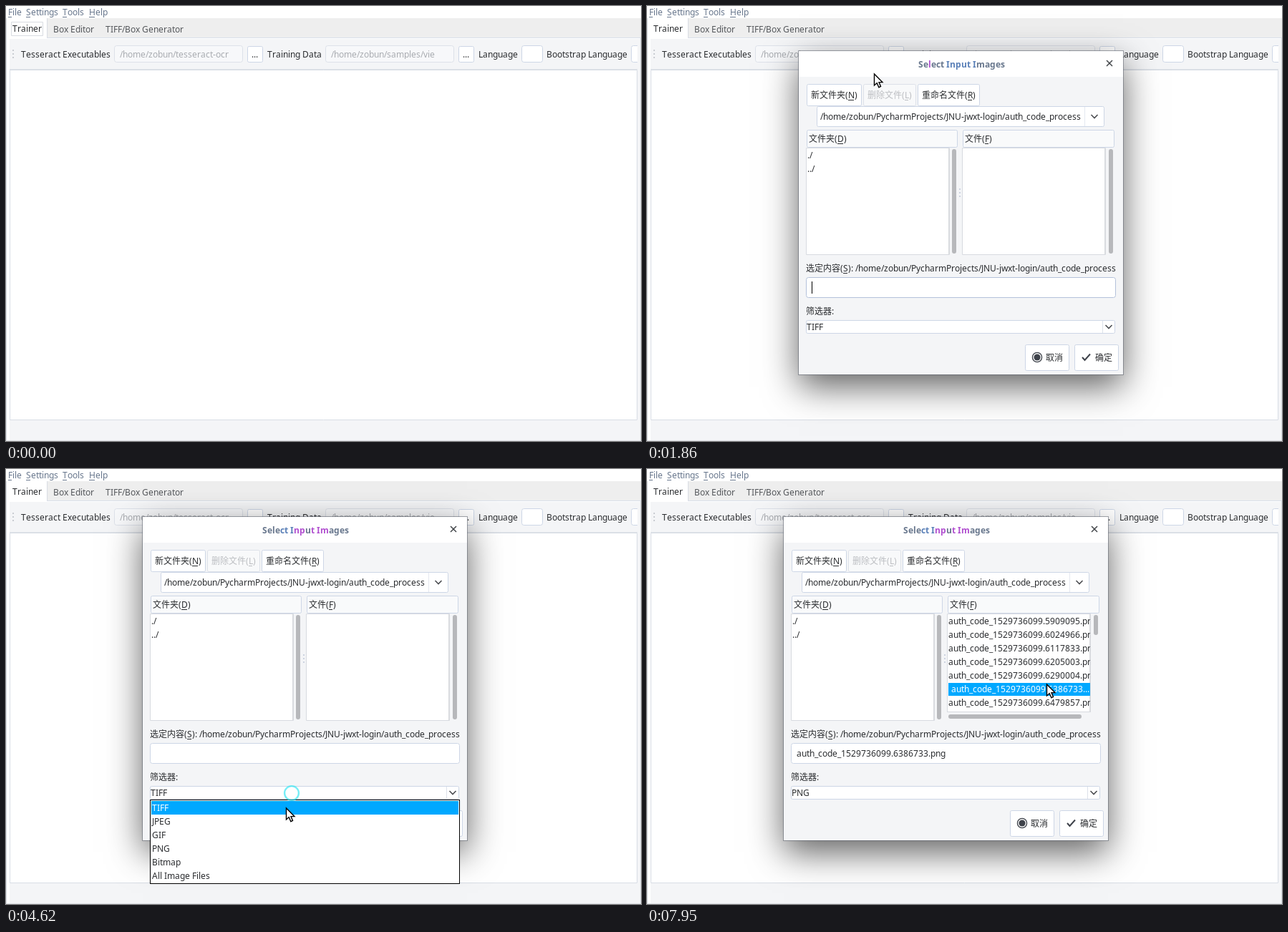
Write an HTML page with a canvas that moves like this. It is 887 px wide and 608 px high and loops after 7990 ms.

```html
<!DOCTYPE html>
<html lang="en">
<head>
<meta charset="utf-8">
<title>Training tool file dialog</title>
<style>
html, body { margin: 0; width: 100%; height: 100%; overflow: hidden; background: #fff; }
canvas { display: block; }
</style>
</head>
<body>
<canvas id="stage" width="887" height="608"></canvas>
<script>
const W = 887, H = 608, LOOP = 7990;
const stage = document.getElementById('stage').getContext('2d');
const layer = Object.assign(document.createElement('canvas'), { width: W, height: H }).getContext('2d');
let g = stage;

const FAMILY = '"Noto Sans", "Noto Sans CJK SC", "Noto Sans CJK", sans-serif';
const PLAIN = '12px ' + FAMILY, BOLD = 'bold 12px ' + FAMILY;
const INK = '#2b2d30', SLATE = '#68778d', EDGE = '#cdd6e6', PALE = '#dde1e9', BODY = '#f4f5f7', BLUE = '#00a8ff';
const HOME = '/home/zobun';
const PATHS = ['/PycharmProjects/JNU-jwxt-login/auth_code_process', '/PycharmProjects/JNU-jwxt-login', '/PycharmProjects', '']
  .map(p => HOME + p).concat('/home', '/');
const FILTERS = ['TIFF', 'JPEG', 'GIF', 'PNG', 'Bitmap', 'All Image Files'];
const FILES = ['5909095', '6024966', '6117833', '6205003', '6290004', '6386733', '6479857']
  .map(n => 'auth_code_1529736099.' + n);
const PICKED = 5;

// Pointer path: time, x, y
const PATH = [
  [240, 425, 487], [880, 88, 5], [1040, 88, 5], [1170, 98, 27], [1440, 98, 27], [1580, 115, 31],
  [1860, 317, 95], [2180, 400, 80], [2220, 400, 80], [2600, 379, 84], [2680, 379, 84],
  [2990, 486, 159], [3130, 486, 159], [3290, 488, 178], [3540, 482, 245], [3860, 498, 159],
  [3920, 498, 159], [4460, 399, 453], [4520, 399, 453], [4620, 391, 474], [4820, 369, 505],
  [5050, 369, 505], [5170, 367, 517], [5400, 367, 517], [5770, 350, 453], [6080, 350, 453],
  [6410, 344, 505], [6610, 345, 528], [6900, 345, 528], [7200, 557, 297], [7910, 557, 297], [7950, 558, 301]
];
const CLICKS = [
  [890, 88, 9], [1410, 98, 27], [2220, 400, 80], [3090, 486, 159], [3900, 498, 159],
  [4500, 399, 453], [5370, 367, 517], [6050, 350, 453], [6880, 345, 528], [7340, 557, 297]
];

const clamp = (v, a, b) => Math.max(a, Math.min(b, v));
const between = (t, a, b) => t >= a && t < b;

function rect(x, y, w, h, color) {
  g.fillStyle = color;
  g.fillRect(x, y, w, h);
}

function box(x, y, w, h, fill = '#fff', edge = EDGE, r = 2) {
  g.beginPath();
  g.roundRect(x + .5, y + .5, w - 1, h - 1, r);
  g.fillStyle = fill;
  g.fill();
  g.strokeStyle = edge;
  g.lineWidth = 1;
  g.stroke();
}

function pill(x, y, w, h, color = '#b7b8bb') {
  g.beginPath();
  g.roundRect(x, y, w, h, Math.min(w, h) / 2);
  g.fillStyle = color;
  g.fill();
}

function line(points, color, width) {
  g.beginPath();
  points.forEach(([x, y]) => g.lineTo(x, y));
  g.strokeStyle = color;
  g.lineWidth = width;
  g.stroke();
}

// Advances snap to whole pixels; "&" underlines the next character.
const widths = new Map();
function text(s, x, y, color = INK, font = PLAIN) {
  g.font = font;
  let mark = false, i = 0;
  for (const ch of s) {
    if (ch === '&') { mark = true; continue; }
    const key = font + ch;
    if (!widths.has(key)) widths.set(key, Math.round(g.measureText(ch).width));
    const w = widths.get(key);
    g.fillStyle = typeof color === 'function' ? color(i) : color;
    g.fillText(ch, x, y);
    if (mark) g.fillRect(x, y + 2, w - 1, 1);
    mark = false;
    x += w;
    i++;
  }
}

function clipped(x, y, w, h, draw) {
  g.save();
  g.beginPath();
  g.rect(x, y, w, h);
  g.clip();
  draw();
  g.restore();
}

const chevron = (x, y) => line([[x - 4.5, y - 2], [x, y + 2.5], [x + 4.5, y - 2]], '#4c4e52', 1.6);

function dots(x, y, step, color) {
  for (let i = 0; i < 3; i++) rect(x, y + i * step, 2, 2, color);
}

function pointer(t) {
  if (t < PATH[0][0]) return null;
  let i = PATH.findIndex(k => k[0] > t) - 1;
  if (i < 0) return PATH[PATH.length - 1].slice(1);
  const a = PATH[i], b = PATH[i + 1], d = b[0] - a[0], u = (t - a[0]) / d;
  const slope = (n, c) => {
    const p = PATH[n - 1], q = PATH[n + 1];
    if (!p || !q || p[c] === PATH[n][c] || q[c] === PATH[n][c]) return 0;
    return (q[c] - p[c]) / (q[0] - p[0]);
  };
  return [1, 2].map(c => {
    const v = 1 - u;
    return Math.round(a[c] * v * v * (1 + 2 * u) + b[c] * u * u * (3 - 2 * u)
      + d * u * v * (slope(i, c) * v - slope(i + 1, c) * u));
  });
}

function mainWindow(t) {
  rect(0, 0, W, H, '#fff');
  [['&File', 3], ['&Settings', 28], ['&Tools', 79], ['&Help', 116]].forEach(([s, x]) => text(s, x, 13, SLATE));
  rect(57, 17, 830, 28, '#eee');
  rect(5, 46, 881, 561, BODY);
  rect(57, 17, 1, 28, '#d9dde4');
  rect(57, 44, 830, 1, '#d9dfea');
  rect(0, 17, 1, 591, '#d9dde4');
  rect(886, 45, 1, 563, '#d9dde4');
  rect(0, 607, W, 1, '#e0e3e8');
  if (t < 900) box(7, 22, 45, 20, '#fff', '#d8dbe1', 0);
  text('Trainer', 9, 36);
  text('Box Editor', 66, 37, '#55585c');
  text('TIFF/Box Generator', 139, 37, '#55585c');

  dots(9, 61, 5, '#c9ccd2');
  text('Tesseract Executables', 21, 72);
  text('Training Data', 365, 72);
  text('Language', 660, 72);
  text('Bootstrap Language', 755, 72);
  [[151, '/tesseract-ocr'], [446, '/samples/vie']].forEach(([x, p]) => {
    box(x, 55, 180, 24, '#f7f8fa', PALE, 3);
    clipped(x, 56, 178, 18, () => text(HOME + p, x + 8, 72, '#a9acb1'));
    box(x + 186, 56, 22, 23);
    text('...', x + 192, 72);
  });
  box(720, 55, 30, 24, '#fff', EDGE, 3);
  clipped(860, 50, 22, 34, () => box(873, 55, 30, 24, '#fff', EDGE, 3));

  box(5, 89, 877, 490, '#fff', '#d8dde5', 0);
  rect(5, 88, 877, 1, '#dde1e7');
}

function toolsMenu(t) {
  if (!between(t, 950, 1410)) return;
  const hot = t >= 1090;
  box(78, 18, 142, 28, hot ? BLUE : '#fff', EDGE, 0);
  text('Merge TIFF...', 88, 36, hot ? '#fff' : INK);
}

function fileList() {
  return FILES.map((name, i) => [name, 150 + 19 * i]);
}

function dialog(t) {
  const loaded = t >= 6960, picked = t >= 7380, focus = t < 3090;
  g.save();
  g.shadowColor = 'rgba(0,0,0,.62)';
  g.shadowBlur = 46;
  g.shadowOffsetY = 17;
  rect(0, 0, 453, 452, BODY);
  g.restore();
  rect(0, 0, 453, 36, '#fff');
  g.strokeStyle = 'rgba(90,96,106,.55)';
  g.lineWidth = 1;
  g.strokeRect(-.5, -.5, 454, 453);

  const moved = t >= 2220;
  text('Select Input Images', 167, 23, i => {
    if (moved) return between(i, 8, 15) && i !== 10 ? '#b14fd0' : between(i, 4, 8) ? '#5a80b8' : SLATE;
    return i === 2 ? '#b14fd0' : between(i, 7, 14) ? '#5a80b8' : SLATE;
  }, BOLD);
  line([[430, 13], [438, 21]], '#3f4246', 1.4);
  line([[438, 13], [430, 21]], '#3f4246', 1.4);

  box(11, 46, 77, 31);
  text('新文件夹(&N)', 17, 66);
  box(90, 46, 74, 31, '#f8f9fa', PALE);
  text('删除文件(&L)', 96, 66, '#bcbec2');
  box(166, 46, 87, 31);
  text('重命名文件(&R)', 172, 66);

  box(25, 77, 402, 29);
  rect(399, 78, 1, 27, '#e4e8f0');
  text(PATHS[0], 30, 96);
  chevron(413, 91);

  box(11, 110, 211, 25, '#f9fafb');
  text('文件夹(&D)', 14, 127);
  box(229, 110, 212, 25, '#f9fafb');
  text('文件(&F)', 232, 127);
  [10, 228].forEach(x => {
    box(x, 135, 201, 150, '#fff', '#d7dae0', 0);
    rect(x + 199, 136, 2, 148, '#d9dbdf');
  });
  text('./', 12, 150);
  text('../', 12, 169);
  pill(214, 137, 6, 146);
  dots(224, 192, 5, '#ccd3e0');
  pill(433, 137, 6, loaded ? 28 : 146);

  if (loaded) {
    rect(227, 272, 203, 14, BODY);
    rect(228, 272, 201, 1, '#d7dae0');
    pill(230, 276, 186, 6);
    clipped(229, 136, 199, 136, () => fileList().forEach(([name, y], i) => {
      if (picked && i === PICKED) {
        rect(230, 232, 198, 18, BLUE);
        text(name + '...', 234, y, '#fff');
      } else text(name + '.png', 230, y);
    }));
  }

  text('选定内容(&S): ' + PATHS[0], 10, 308);
  box(10, 316, 433, 29, '#fff', focus ? '#b3c1da' : EDGE, 3);
  if (focus) rect(18, 322, 1, 17, '#000');
  if (picked) text(FILES[PICKED] + '.png', 18, 335);

  text('筛选器:', 10, 368);
  box(10, 376, 432, 19);
  rect(424, 377, 1, 17, '#dce1ea');
  text(t < 5400 ? 'TIFF' : t < 6920 ? 'GIF' : 'PNG', 11, 390);
  chevron(433, 385);

  box(316, 410, 62, 37);
  g.beginPath();
  g.arc(333, 428, 6.6, 0, 7);
  g.strokeStyle = '#3f434b';
  g.lineWidth = 1.3;
  g.stroke();
  g.beginPath();
  g.arc(333, 428, 4.6, 0, 7);
  g.fillStyle = '#3f434b';
  g.fill();
  text('取消', 345, 433);
  box(385, 410, 62, 37);
  line([[396, 428], [399.5, 432], [407, 423.5]], '#3f434b', 2);
  text('确定', 414, 433);
}

function dialogSpot(t, cur) {
  if (t < 2220) return [212, 63];
  if (t < 2600) return [cur[0] - 188, cur[1] - 17];
  return [191, 67];
}

function showDialog(t, cur) {
  if (t < 1500) return;
  const [x, y] = dialogSpot(t, cur);
  const p = clamp((t - 1500) / 200, 0, 1), e = 1 - (1 - p) ** 2;
  g = layer;
  g.clearRect(0, 0, W, H);
  g.save();
  g.translate(x, y);
  dialog(t);
  g.restore();
  g = stage;
  g.save();
  if (e < 1) {
    g.translate(0, y - 11 * (1 - e));
    g.scale(1, e);
    g.translate(0, -y);
    g.globalAlpha = e;
    rect(x, y, 453, 452, 'rgba(0,0,0,.18)');
  }
  g.drawImage(layer.canvas, 0, 0);
  g.restore();
}

function popup(x, y, w, rows, rowH, inset, hot) {
  rect(x, y, w, rows.length * rowH + 4, '#000');
  rect(x + 1, y + 1, w - 2, rows.length * rowH + 2, '#fff');
  rows.forEach((s, i) => {
    const top = y + 2 + i * rowH;
    if (i === hot) rect(x + inset, top, w - 2 * inset, rowH, BLUE);
    text(s, x + (rowH > 20 ? 7 : 3), top + Math.floor(rowH / 2) + 5, i === hot ? '#fff' : INK);
  });
}

function popups(t, cur) {
  const row = (top, h, rest) => cur[1] < top ? rest : clamp(Math.floor((cur[1] - top) / h), 0, 5);
  if (between(t, 3130, 3900)) popup(216, 173, 403, PATHS, 29, 1, row(175, 29, 0));
  const first = between(t, 4540, 5400);
  if (first || between(t, 6090, 6920)) popup(201, 462, 433, FILTERS, 19, 2, row(464, 19, first ? 0 : 2));
}

function rings(t) {
  for (const [start, x, y] of CLICKS) {
    const age = t - start;
    if (!between(age, 0, 300)) continue;
    g.globalAlpha = 1 - age / 330;
    g.beginPath();
    g.arc(x, y, 8 + age * .016, 0, 7);
    g.strokeStyle = '#28e4f2';
    g.lineWidth = 3 - age / 200;
    g.stroke();
    g.globalAlpha = 1;
  }
}

function arrow([x, y]) {
  const shape = [[0, 0], [0, 16], [3.7, 12.6], [6.4, 18.7], [9, 17.5], [6.5, 11.6], [11.4, 11.6]];
  g.beginPath();
  shape.forEach(([dx, dy]) => g.lineTo(x + .5 + dx, y + dy));
  g.closePath();
  g.fillStyle = '#fff';
  g.fill();
  g.strokeStyle = '#000';
  g.lineWidth = 1.4;
  g.stroke();
}

function draw(t) {
  const cur = pointer(t);
  mainWindow(t);
  toolsMenu(t);
  showDialog(t, cur);
  if (cur) popups(t, cur);
  rings(t);
  if (cur) arrow(cur);
}

let begin;
function tick(now) {
  begin ??= now;
  draw((now - begin) % LOOP);
  requestAnimationFrame(tick);
}
draw(0);
requestAnimationFrame(tick);
</script>
</body>
</html>
```
